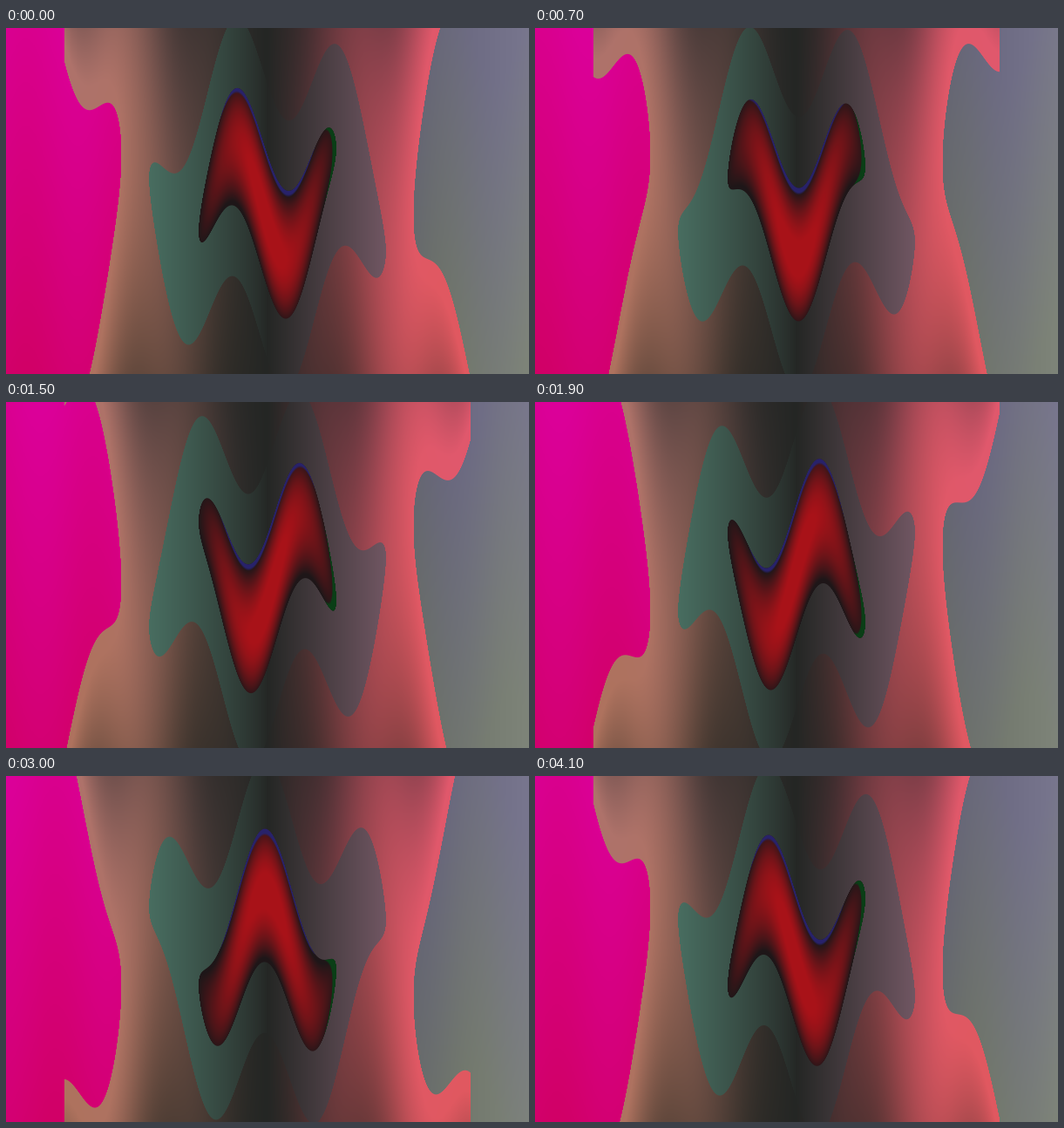
Recreate the animation shown at these times as an HTML page with a canvas. Size 600 px wide and 397 px high, loop 4200 ms.

```html
<!DOCTYPE html>
<html lang="en">
<head>
<meta charset="utf-8">
<title>Wave</title>
<style>
  html, body { margin: 0; width: 100%; height: 100%; overflow: hidden; background: #242624; }
  canvas { display: block; }
</style>
</head>
<body>
<canvas id="stage" width="600" height="397"></canvas>
<script>
const W = 600, H = 397, CX = 299.5, CY = 198;
const LOOP = 4200, STEP = 100;
const AMP = 61.5, WAVELENGTH = 120, TROUGH = 322;

const WAIST = 167.5, SIDE_LIMIT = 232.5;
const RING = { w: 136, h: 158, power: 1.75 };
const CORE = { w: 79, h: 76.5, power: 2 };

const DARK = [36, 38, 36];
const SALMON = [174, 114, 100], PINK = [224, 88, 102];
const GREEN = [72, 109, 96], PURPLE = [112, 86, 98];
const SLATE_TOP = [111, 109, 133], SLATE_BOTTOM = [117, 123, 112];
const BLUE = [40, 34, 106], LEAF = [10, 62, 22];
const EMBER = [30, 22, 24], RED = [168, 18, 24];

const ctx = document.getElementById('stage').getContext('2d');
const img = ctx.createImageData(W, H);
const px = img.data;

const sat = n => n < 0 ? 0 : n > 1 ? 1 : n;

// Half-height of a superellipse at distance d from its axis
const halfHeight = ({ w, h, power }, d) =>
  d < w ? h * Math.pow(1 - Math.pow(d / w, power), 1 / power) : -9;

// Undistorted shapes in each column
const columns = Array.from({ length: W }, (_, x) => {
  const dx = x - CX, d = Math.abs(dx);
  return {
    x, dx, d,
    side: d > SIDE_LIMIT ? Infinity : d > WAIST ? Math.sqrt(625 * (d - WAIST)) : -9,
    ring: halfHeight(RING, d),
    core: halfHeight(CORE, d),
    blue: 8 * Math.sqrt(sat(1 - (dx / 55) ** 2))
  };
});

const out = [0, 0, 0];
function blend(color, k) {
  for (let i = 0; i < 3; i++) out[i] += (color[i] - out[i]) * k;
}
function fade(from, to, k, cover) {
  for (let i = 0; i < 3; i++) out[i] += (from[i] + (to[i] - from[i]) * k - out[i]) * cover;
}

function shadeBand({ dx, d }, v) {
  const reach = sat(d * (1 - 0.22 * (v / CY) ** 2) / WAIST);
  if (dx < 0) fade(DARK, SALMON, Math.pow(reach, 1.4), 1);
  else fade(DARK, PINK, Math.pow(reach, 1.1), 1);
  out[2] -= 0.03 * v * reach;
}

function shadeSide({ x, dx }, v, cover) {
  if (dx < 0) {
    blend([214 - 0.02 * v, 0, 128 - 0.1 * v], cover);
  } else {
    fade(SLATE_TOP, SLATE_BOTTOM, sat(0.5 + v / H), cover);
    const lift = (x - 545) * 0.16 * cover;
    for (let i = 0; i < 3; i++) out[i] += lift;
  }
}

function shadeRing({ dx, d }, cover) {
  if (dx < 0) fade(DARK, GREEN, Math.pow(d / RING.w, 0.8), cover);
  else fade(DARK, PURPLE, d / RING.w, cover);
}

function shadeCore(col, v, shift, cover) {
  // The glow swings a little further than the outline
  const r2 = (col.dx / CORE.w) ** 2 + ((v - 0.08 * shift) / CORE.h) ** 2;
  fade(EMBER, RED, sat(1.08 * (1 - r2)), cover);
  blend(BLUE, cover * sat((col.blue - v - col.core) / 3));
  if (col.dx > 60) {
    const right = CORE.w * Math.sqrt(sat(1 - (v / CORE.h) ** 2));
    blend(LEAF, cover * sat(5 * (1 - (v / 45) ** 2) - right + col.dx));
  }
}

function shade(col, v, shift) {
  const cover = half => sat(half - Math.abs(v) + 0.5);
  const side = cover(col.side), ring = cover(col.ring), core = cover(col.core);
  if (side < 1 && ring < 1) shadeBand(col, v);
  if (side) shadeSide(col, v, side);
  if (ring) shadeRing(col, ring);
  if (core) shadeCore(col, v, shift, core);
}

function draw(t) {
  const trough = TROUGH - WAVELENGTH * t / LOOP;
  for (const col of columns) {
    const shift = AMP * Math.cos(2 * Math.PI * (col.x - trough) / WAVELENGTH);
    for (let y = 0; y < H; y++) {
      shade(col, y - shift - CY, shift);
      const i = 4 * (y * W + col.x);
      px[i] = out[0];
      px[i + 1] = out[1];
      px[i + 2] = out[2];
      px[i + 3] = 255;
    }
  }
  ctx.putImageData(img, 0, 0);
}

const start = performance.now();
let shown = -1;
function tick() {
  const step = Math.floor(((performance.now() - start) % LOOP) / STEP);
  if (step !== shown) {
    shown = step;
    draw(step * STEP);
  }
  requestAnimationFrame(tick);
}
tick();
</script>
</body>
</html>
```
